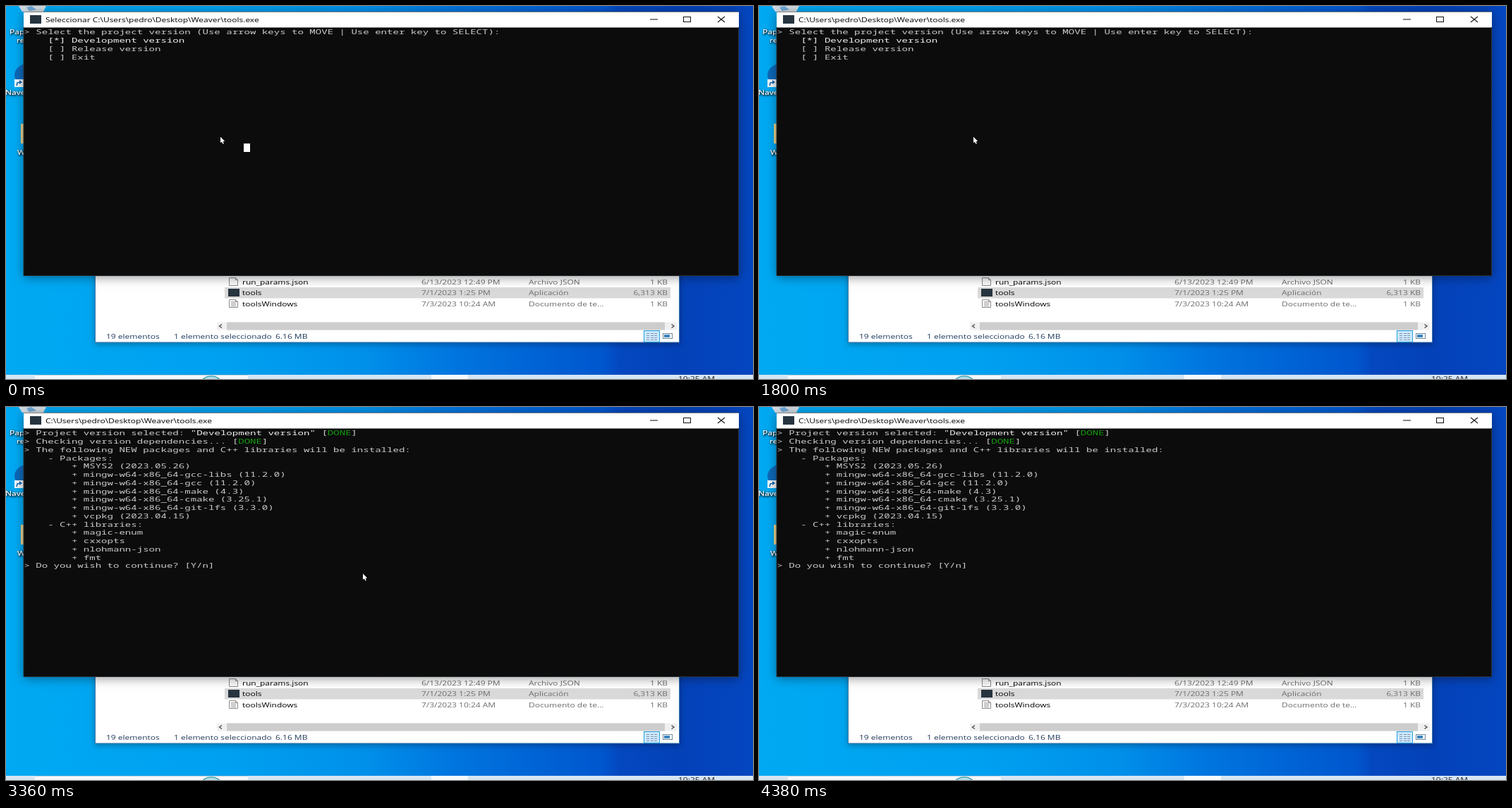
An HTML page with a canvas for the animation above (4690 ms loop, 1059 by 529 pixels).

```html
<!DOCTYPE html>
<html lang="es">
<head>
<meta charset="utf-8">
<title>Console installer</title>
<style>
html, body { margin: 0; width: 100%; height: 100%; overflow: hidden; background: #0078d7; }
canvas { display: block; }
</style>
</head>
<body>
<canvas id="stage" width="1059" height="529"></canvas>
<script>
const ctx = document.getElementById('stage').getContext('2d');
const LOOP = 4690;
const TICK = 100 / 3;
const SCALE_X = 1.055, SCALE_Y = 0.734;
const UI_FONT = '11.36px "Open Sans", "Noto Sans", sans-serif';
const MONO_FONT = '13.33px "Noto Sans Mono", "DejaVu Sans Mono", monospace';
const GREY = '#cccccc', BRIGHT = '#f2f2f2', GREEN = '#13a10e';
const PATH = 'C:\\Users\\pedro\\Desktop\\Weaver\\tools.exe';

const MENU = ['Development version', 'Release version', 'Exit'];
const HINT = '(Use arrow keys to MOVE | Use enter key to SELECT):';
const PLAN = [
  '> The following NEW packages and C++ libraries will be installed:',
  '    - Packages:',
  '        + MSYS2 (2023.05.26)',
  '        + mingw-w64-x86_64-gcc-libs (11.2.0)',
  '        + mingw-w64-x86_64-gcc (11.2.0)',
  '        + mingw-w64-x86_64-make (4.3)',
  '        + mingw-w64-x86_64-cmake (3.25.1)',
  '        + mingw-w64-x86_64-git-lfs (3.3.0)',
  '        + vcpkg (2023.04.15)',
  '    - C++ libraries:',
  '        + magic-enum',
  '        + cxxopts',
  '        + nlohmann-json',
  '        + fmt',
  '> Do you wish to continue? [Y/n]'
];

// Pointer keys: time, x, y
const POINTER = [
  [3267, 304, 185.5], [3333, 400, 210], [3367, 507, 236.5], [3400, 582, 258],
  [3433, 772, 318], [3467, 864, 368], [3533, 945, 430], [3667, 995, 478],
  [3800, 1008, 493.5], [3900, 1018, 508], [4000, 1030, 519],
  [4100, 1045, 522], [4200, 1049, 530]
];

function rect(x, y, w, h, color) {
  ctx.fillStyle = color;
  ctx.fillRect(x, y, w, h);
}

function shadowRect(x, y, w, h, color, blur, alpha) {
  ctx.save();
  ctx.shadowColor = `rgba(0,0,0,${alpha})`;
  ctx.shadowBlur = blur;
  ctx.shadowOffsetY = 2;
  rect(x, y, w, h, color);
  ctx.restore();
}

function outline(x, y, w, h, color) {
  ctx.strokeStyle = color;
  ctx.lineWidth = 1;
  ctx.strokeRect(x + 0.5, y + 0.5, w - 1, h - 1);
}

function line(points, color, width = 1) {
  ctx.beginPath();
  points.forEach(([x, y]) => ctx.lineTo(x, y));
  ctx.strokeStyle = color;
  ctx.lineWidth = width;
  ctx.stroke();
}

function polygon(points, color) {
  ctx.beginPath();
  points.forEach(([x, y]) => ctx.lineTo(x, y));
  ctx.closePath();
  ctx.fillStyle = color;
  ctx.fill();
}

function text(str, x, y, color, font = UI_FONT, align = 'left') {
  ctx.save();
  ctx.translate(x, y);
  ctx.scale(SCALE_X, SCALE_Y);
  ctx.font = font;
  ctx.textAlign = align;
  ctx.fillStyle = color;
  ctx.fillText(str, 0, 0);
  ctx.restore();
}

function put(row, col, str, color = GREY) {
  text(str, 25.4 + col * 8.44, 40.3 + row * 11.75, color, MONO_FONT);
}

function label(str, x, y) {
  ctx.save();
  ctx.shadowColor = '#000';
  ctx.shadowBlur = 3;
  ctx.shadowOffsetX = ctx.shadowOffsetY = 1;
  text(str, x, y, '#fff');
  text(str, x, y, '#fff');
  ctx.restore();
}

function drawDesktop() {
  const sky = ctx.createLinearGradient(0, 0, 1059, 0);
  [[0, '#00a9f2'], [0.3, '#00a0f0'], [0.48, '#0090ea'], [0.6, '#0075df'],
   [0.72, '#0062d5'], [0.8, '#0056ce'], [0.82, '#0448c0'], [0.9, '#0341b8'], [1, '#0446c0']]
    .forEach(([at, color]) => sky.addColorStop(at, color));
  rect(0, 0, 1059, 529, sky);

  polygon([[18, 0], [57, 0], [53, 8], [23, 8]], '#d3dce4');
  polygon([[29, 2], [36, 0], [43, 5], [33, 7]], '#6fa9d8');
  label('Papelera de', 5, 40);
  label('reciclaje', 15, 51.5);

  ctx.beginPath();
  ctx.ellipse(34, 98, 22, 17, 0, 0, Math.PI * 2);
  ctx.fillStyle = '#0c68b8';
  ctx.fill();
  rect(12, 104, 13, 11, '#f4f8fb');
  line([[15, 113], [16, 109], [21, 108]], '#1769b5', 1.5);
  polygon([[19, 105], [23, 108], [19, 111]], '#1769b5');
  label('Navegador', -1, 126);

  rect(21, 167, 5, 28, '#ecd18b');
  label('Weaver', 16, 211);
}

function drawTaskbar() {
  rect(0, 523, 1059, 6, '#d5e5f2');
  rect(41, 523, 302, 6, '#f5f8fa');
  rect(41, 523, 302, 1, '#bccbd8');
  rect(603, 523, 52, 6, '#f7fafc');
  ctx.beginPath();
  ctx.ellipse(291, 533, 13, 8, 0, 0, Math.PI * 2);
  ctx.fillStyle = '#b9dfe8';
  ctx.fill();
  ctx.strokeStyle = '#4aa5b8';
  ctx.lineWidth = 1.5;
  ctx.stroke();
  text('10:25 AM', 953, 532, '#222');
}

function page(y, lined) {
  polygon([[316, y], [326, y], [329, y + 3], [329, y + 12], [316, y + 12]], '#fafafa');
  line([[316.5, y + 0.5], [325.5, y + 0.5], [328.5, y + 3.5], [328.5, y + 11.5],
        [316.5, y + 11.5], [316.5, y + 0.5]], '#8b8b8b');
  line([[325.5, y + 0.5], [325.5, y + 3.5], [328.5, y + 3.5]], '#8b8b8b');
  if (lined) for (let i = 3; i < 11; i += 2) rect(319, y + i, 7, 1, '#a5a5a5');
}

function drawExplorer() {
  shadowRect(126, 300, 829, 177.5, '#3c78ad', 8, 0.3);
  rect(127, 300, 827, 176.5, '#fff');
  rect(310, 399, 632, 15.5, '#d9d9d9');

  page(385, false);
  rect(315, 401, 16, 11, '#26343f');
  page(416, true);

  [['run_params.json', '6/13/2023 12:49 PM', 'Archivo JSON', '1 KB'],
   ['tools', '7/1/2023 1:25 PM', 'Aplicación', '6,313 KB'],
   ['toolsWindows', '7/3/2023 10:24 AM', 'Documento de te...', '1 KB']]
    .forEach(([name, date, type, size], i) => {
      const y = 394.7 + i * 15.45;
      text(name, 335, y, '#000');
      text(date, 589, y, '#6d6d6d');
      text(type, 741, y, '#6d6d6d');
      text(size, 938, y, '#6d6d6d', UI_FONT, 'right');
    });

  rect(299, 448.5, 652, 11, '#f0f0f0');
  rect(313, 448.5, 621, 11, '#cdcdcd');
  line([[306, 451.5], [302.5, 454], [306, 456.5]], '#505050', 1.4);
  line([[943.5, 451.5], [947, 454], [943.5, 456.5]], '#505050', 1.4);

  text('19 elementos', 142, 472.3, '#1e395b');
  text('1 elemento seleccionado', 238, 472.3, '#1e395b');
  text('6.16 MB', 382, 472.3, '#1e395b');

  rect(904, 460, 23, 17, '#cce8ff');
  outline(904, 460, 23, 17, '#26a0da');
  for (let y = 464; y < 474; y += 3) {
    for (const x of [908, 914, 919]) rect(x, y, 4, 1, '#8296a6');
  }
  rect(931, 464, 14, 8, '#71889c');
  rect(932, 465, 12, 6, '#fff');
  rect(933, 466, 8, 4, '#3b83bd');
}

function drawConsoleFrame(title) {
  shadowRect(25, 8, 1014, 375, '#0c0c0c', 14, 0.4);
  rect(25, 8.5, 1014, 22, '#fff');
  line([[25, 30], [25, 382.5], [1038.5, 382.5], [1038.5, 30]], '#2a333a');
  rect(34, 13, 16, 12, '#26343f');
  text(title, 56, 22.5, '#000');
  rect(913, 18.5, 11, 1, '#111');
  outline(960, 15, 11, 8, '#111');
  line([[1009, 15], [1019, 23]], '#111', 1.1);
  line([[1019, 15], [1009, 23]], '#111', 1.1);
}

function drawMenu(selected) {
  MENU.forEach((item, i) => {
    const active = i === selected;
    put(i + 1, 4, `[${active ? '*' : ' '}] ${item}`, active ? BRIGHT : GREY);
  });
}

function drawConsole(t) {
  drawConsoleFrame((t < 770 ? 'Seleccionar ' : '') + PATH);
  if (t < 770) rect(337, 195, 9, 12, '#fff');

  if (t < 2700) put(0, 0, '> Select the project version ' + HINT);
  else if (t < 2730) put(0, 0, '> Project version selected:  ' + HINT);
  else {
    put(0, 0, '> Project version selected:');
    put(0, 28, '"Development version"', BRIGHT);
    put(0, 50, '[    ]');
    put(0, 51, 'DONE', GREEN);
  }

  if (t < 2800) {
    const selected = t < 900 || t >= 1800 ? 0 : t < 930 ? -1 : 1;
    drawMenu(selected);
  }
  if (t >= 2960) put(1, 0, '> Checking version dependencies...');
  if (t >= 3200) {
    put(1, 35, '[    ]');
    put(1, 36, 'DONE', GREEN);
    PLAN.forEach((row, i) => put(i + 2, 0, row));
  }
}

function pointerAt(t) {
  const now = Math.floor((t + 8) / TICK) * TICK;
  const next = POINTER.findIndex(key => key[0] > now);
  if (next === 0) return POINTER[0].slice(1);
  if (next < 0) return POINTER[POINTER.length - 1].slice(1);
  const [t0, x0, y0] = POINTER[next - 1];
  const [t1, x1, y1] = POINTER[next];
  const k = (now - t0) / (t1 - t0);
  return [x0 + (x1 - x0) * k, y0 + (y1 - y0) * k];
}

function drawPointer(t) {
  const [x, y] = pointerAt(t);
  const shape = [[0, 0], [0, 8.6], [2, 7.2], [3.5, 10.2], [4.9, 9.5], [3.6, 6.7], [6.2, 6.3]]
    .map(([dx, dy]) => [x + dx, y + dy]);
  line([...shape, shape[0]], '#000', 1.2);
  polygon(shape, '#fff');
}

function frame() {
  const t = performance.now() % LOOP;
  drawDesktop();
  drawTaskbar();
  drawExplorer();
  drawConsole(t);
  drawPointer(t);
  requestAnimationFrame(frame);
}
frame();
</script>
</body>
</html>
```
